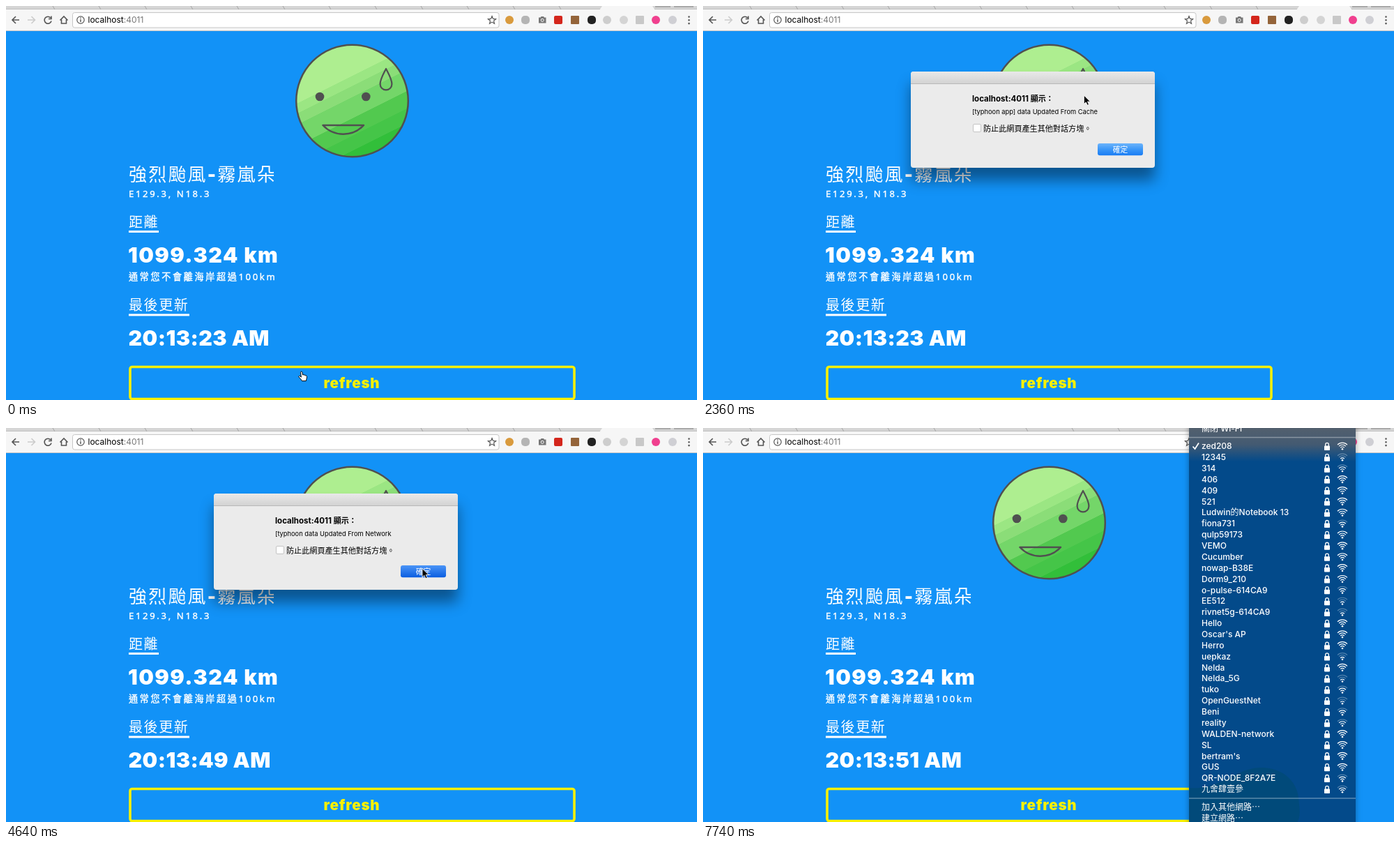
Animation of 991x565 px, one loop 8000 ms. Source, as an HTML page:

```html
<!DOCTYPE html>
<html lang="zh-TW">
<head>
<meta charset="utf-8">
<title>Typhoon distance</title>
<style>
html, body { margin: 0; width: 100%; height: 100%; overflow: hidden; background: #1292f7; }
svg { display: block; width: 991px; height: 565px; }
text { font-family: Inter, "Noto Sans CJK TC", "Noto Sans CJK", sans-serif; white-space: pre; }
.page { fill: #fff; }
.page text { font-family: "Noto Sans", "Noto Sans CJK TC", "Noto Sans CJK", sans-serif; }
.page .big { font: 900 30.5px Inter, sans-serif; letter-spacing: 1.4px; }
.page #clock { letter-spacing: .4px; }
.page .small { font-size: 13.1px; letter-spacing: 2.65px; stroke: #fff; stroke-width: .4px; }
.page .label { font-size: 20px; letter-spacing: 1.6px; }
.page .button { font: 900 20.5px Inter, sans-serif; letter-spacing: .8px; fill: #f8f000; }
.line { fill: none; stroke: #505050; stroke-width: 2.5; stroke-linejoin: round; }
.icon { fill: none; stroke: #555; stroke-width: 1.6; }
.menu { font-size: 12px; font-weight: 500; fill: #fff; }
.shadow { filter: drop-shadow(0 18px 10px rgba(0, 0, 0, .42)); }
</style>
</head>
<body>
<svg viewBox="0 0 991 565">
  <defs>
    <linearGradient id="skin" gradientUnits="userSpaceOnUse" x1="460.7" y1="64.4" x2="532.3" y2="207.6"></linearGradient>
    <linearGradient id="bar" x2="0" y2="1"><stop stop-color="#e9e9e9"/><stop offset="1" stop-color="#d3d3d3"/></linearGradient>
    <linearGradient id="up" x2="0" y2="1"><stop stop-color="#6cb4fb"/><stop offset=".5" stop-color="#3b97f8"/><stop offset="1" stop-color="#197cf4"/></linearGradient>
    <linearGradient id="down" x2="0" y2="1"><stop stop-color="#4b95f7"/><stop offset="1" stop-color="#0a5de0"/></linearGradient>
    <linearGradient id="glass" gradientUnits="userSpaceOnUse" x1="0" y1="0" x2="0" y2="48">
      <stop stop-color="#53606e"/><stop offset=".5" stop-color="#435a72"/><stop offset="1" stop-color="#034a8a"/>
    </linearGradient>
    <clipPath id="menuBox"><path d="M697 0H936V565H697Z"/></clipPath>
  </defs>

  <rect width="991" height="565" fill="#1292f7"/>

  <g class="page">
    <circle cx="496.5" cy="136" r="80.3" class="line" style="fill:url(#skin)"/>
    <circle cx="450" cy="130" r="6.3" fill="#505050"/>
    <circle cx="516.3" cy="130" r="6.3" fill="#505050"/>
    <path class="line" d="M454.5 171H513A40 40 0 0 1 454.5 171Z"/>
    <path class="line" style="stroke-width:2.2" d="M545 90C541 98 536.6 105 536.6 112A8.4 8.4 0 0 0 553.4 112C553.4 105 549 98 545 90Z"/>

    <text x="176" y="250.5" font-size="26" letter-spacing="2.2">強烈颱風<tspan font-family="Inter, sans-serif" font-weight="900">-</tspan>霧嵐朵</text>
    <text x="176" y="273.5" class="small">E129.3, N18.3</text>
    <text x="176" y="316.5" class="label">距離</text>
    <rect x="176" y="322" width="43" height="3"/>
    <text x="175" y="367.5" class="big">1099.324 km</text>
    <text x="176" y="393" class="small">通常您不會離海岸超過100km</text>
    <text x="176" y="435.5" class="label">最後更新</text>
    <rect x="176" y="441.5" width="87" height="3"/>
    <text x="175.5" y="487" class="big" id="clock"></text>
    <rect x="178" y="517.5" width="637" height="46" rx="3" fill="none" stroke="#f8f000" stroke-width="3.6"/>
    <text x="496" y="547.7" text-anchor="middle" class="button">refresh</text>
  </g>

  <g id="toolbar">
    <rect width="991" height="36" fill="#f6f6f6"/>
    <rect width="991" height="5" fill="#d5d5d5"/>
    <path d="M0 4.5H991M0 35.5H991" stroke="#bdbdbd" stroke-width=".8"/>
    <path id="tabs" stroke="#a5a5a5"/>
    <path d="M851 6L855 0H927L931 6Z" fill="#f6f6f6"/>
    <path d="M931 1H953M958 1H986" stroke="#aaa" stroke-width="2"/>
    <rect x="95.5" y="9.5" width="611.5" height="21.5" rx="3" fill="#fff" stroke="#c6c6c6"/>
    <path class="icon" d="M19 20H9M14 15L9 20L14 25"/>
    <path class="icon" style="stroke:#ccc" d="M31 20H41M36.5 15L41.5 20L36.5 25"/>
    <path class="icon" d="M64 17A5 5 0 1 0 65 21.5M65 14.5V18.5H61"/>
    <path class="icon" d="M77.5 20.5L83 15L88.5 20.5M79.5 19.5V25H86.5V19.5"/>
    <circle class="icon" style="stroke-width:1.2" cx="107" cy="20" r="5.2"/>
    <path class="icon" style="stroke-width:1.4" d="M107 19V23M107 16.6V18"/>
    <text x="117.5" y="24.4" font-size="12">localhost<tspan fill="#777">:4011</tspan></text>
    <path class="icon" style="stroke-width:1.2" d="M697 14.5L698.6 18.4L702.6 18.7L699.5 21.3L700.5 25.3L697 23.1L693.5 25.3L694.5 21.3L691.4 18.7L695.4 18.4Z"/>
    <g id="badges"></g>
    <path d="M764 16.5H766.5L767.5 15H771L772 16.5H774.5V24.5H764Z" fill="#777"/>
    <circle cx="769.2" cy="20.3" r="2" fill="none" stroke="#fff"/>
    <path d="M979.5 15.5V26" stroke="#555" stroke-width="2.6" stroke-linecap="round" stroke-dasharray="0 4.8"/>
  </g>

  <g id="dialog">
    <rect class="shadow" x="298" y="94" width="350" height="138" rx="4" fill="#ebebeb"/>
    <path d="M298 111V98A4 4 0 0 1 302 94H644A4 4 0 0 1 648 98V111Z" fill="url(#bar)"/>
    <path d="M298 111.5H648" stroke="#b8b8b8"/>
    <text x="386" y="136.8" font-size="11.5" font-weight="700">localhost:4011 <tspan font-size="11">顯示：</tspan></text>
    <text x="386" y="155.3" font-size="9.3" id="message"></text>
    <rect x="387.5" y="169.5" width="11" height="11" rx="1.5" fill="#fff" stroke="#c4c4c4"/>
    <text x="402" y="179.5" font-size="11.1">防止此網頁產生其他對話方塊。</text>
    <rect id="ok" x="566" y="197" width="65" height="17.3" rx="3"/>
    <text x="598.5" y="209.6" font-size="10.8" text-anchor="middle" fill="#fff">確定</text>
  </g>

  <g id="menu" class="menu">
    <rect x="697" y="-5" width="239" height="575" fill="url(#glass)" style="filter:drop-shadow(0 0 4px rgba(0,0,0,.35))"/>
    <path clip-path="url(#menuBox)" d="M697 516C740 520 765 487 800 487S852 510 854 530S858 556 850 570H697Z" fill="#004a74" opacity=".7"/>
    <path d="M697 13.5H936M697 531H936" stroke="#fff" stroke-opacity=".35" stroke-width="1.5"/>
    <text x="715" y="4.5">關閉 Wi-Fi</text>
    <path d="M702.5 26.5L705.5 30L711 21.5" fill="none" stroke="#fff" stroke-width="1.8"/>
    <text x="715" y="547.5">加入其他網路⋯</text>
    <text x="715" y="563.5">建立網路⋯</text>
  </g>

  <g id="cursor" stroke-linejoin="round">
    <path id="arrow" d="M0 0V12.6L2.9 9.9L5 14.3L7.2 13.3L5.2 9.1H9.2Z" stroke="#fff" stroke-width=".9"/>
    <path id="hand" transform="translate(-.5 -.8)" d="M1 1.2C1 -.4 3.2 -.4 3.4 1.2L4 5C4.5 4 6 4.2 6.2 5.3C7 4.5 8 5 8.2 6C9.3 5.4 10 6.2 10 7.2C10 9.5 9.4 10.5 8.8 13.5H3C1.6 11 .2 9.5 -1.6 7.8C-2.4 6.6 -.8 5.8 .4 6.8L1.8 8Z" fill="#fff" stroke="#000"/>
  </g>
</svg>
<script>
const $ = id => document.getElementById(id);
const LOOP = 8000;

function add(parent, tag, attrs, text = '') {
  const el = document.createElementNS('http://www.w3.org/2000/svg', tag);
  for (const key in attrs) el.setAttribute(key, attrs[key]);
  el.textContent = text;
  parent.append(el);
}

// Face shading: flat diagonal bands, each with the end of its range
const bands = [
  [.3, '#aeee90'], [.38, '#9be683'], [.47, '#8bdd78'], [.64, '#74d669'],
  [.78, '#52c94f'], [.9, '#45c548'], [1, '#32bf3a']
];
bands.forEach(([end, color], i) => {
  for (const offset of [i ? bands[i - 1][0] : 0, end])
    add($('skin'), 'stop', { offset, 'stop-color': color });
});

// Browser chrome: tab edges and extension badges
$('tabs').setAttribute('d', Array.from({ length: 12 }, (_, i) => `M${67 + 66 * i} 0l3 5`).join(''));
const badges = [
  [722, '#d99a3d', 6], [745, '#b4b4b4', 5], [792, '#d4261c', 2], [816, '#94643a', 1], [840, '#222', 5],
  [862, '#cdcdcd', 6], [886, '#d4d4d4', 6], [909, '#c8c8c8', 1], [932, '#f0408f', 6], [956, '#cfcfd4', 6]
];
for (const [x, fill, rx] of badges)
  add($('badges'), 'rect', { x: x - 6, y: 14, width: 12, height: 12, rx, fill });

// Wireless networks with signal strength 1 to 3
const networks = `zed208,12345,314,406,409,521,Ludwin的Notebook 13,fiona731,qulp59173,VEMO,Cucumber,
nowap-B38E,Dorm9_210,o-pulse-614CA9,EE512,rivnet5g-614CA9,Hello,Oscar's AP,Herro,uepkaz,Nelda,Nelda_5G,
tuko,OpenGuestNet,Beni,reality,WALDEN-network,SL,bertram's,GUS,QR-NODE_8F2A7E,九舍肆壹參`.replace(/\n/g, '').split(',');
const signals = '31233332333332113331312122333322';
networks.forEach((name, i) => {
  const y = 26 + 15.87 * i, menu = $('menu');
  add(menu, 'text', { x: 715, y: y + 4.2 }, name);
  add(menu, 'rect', { x: 891, y: y - .5, width: 8, height: 6.5, rx: .8 });
  add(menu, 'path', { d: `M892.7 ${y}v-2.3a2.3 2.3 0 0 1 4.6 0v2.3`, fill: 'none', stroke: '#fff', 'stroke-width': 1.3 });
  add(menu, 'circle', { cx: 917, cy: y + 4.3, r: 1.3 });
  for (let k = 1; k <= 3; k++) {
    const r = 1 + 2.9 * k, w = r * .72;
    add(menu, 'path', {
      d: `M${917 - w} ${y + 5 - w}A${r} ${r} 0 0 1 ${917 + w} ${y + 5 - w}`,
      fill: 'none', stroke: '#fff', 'stroke-width': 1.2, opacity: k <= signals[i] ? 1 : .3
    });
  }
});

// Pointer strokes: start, end, steps, then a quadratic curve
const moves = [
  [1430, 1630, 3, 422, 525, 450, 300, 519, 165],
  [1840, 2620, 10, 519, 165, 570, 105, 531, 141],
  [2710, 3100, 5, 531, 141, 570, 165, 597, 201.5],
  [5830, 6000, 3, 597, 201.5, 590, 320, 551, 410],
  [6180, 6740, 7, 551, 410, 675, 260, 686, 18]
];

function pointer(t) {
  const move = moves.filter(m => t >= m[0]).pop();
  if (!move) return [422, 525];
  const [start, end, steps, x0, y0, cx, cy, x1, y1] = move;
  const k = Math.min(1, (Math.floor((t - start) / (end - start) * (steps - 1) + 1e-6) + 1) / steps);
  const curve = (a, b, c) => (1 - k) ** 2 * a + 2 * k * (1 - k) * b + k * k * c;
  return [curve(x0, cx, x1), curve(y0, cy, y1)];
}

const within = (t, a, b) => t >= a && t < b;
const show = (id, on) => $(id).style.display = on ? '' : 'none';

function draw(t) {
  $('clock').textContent = `20:13:${t < 3660 ? 23 : t < 4880 ? 49 : 51} AM`;

  show('dialog', within(t, 980, 3660) || within(t, 3780, 4880));
  const [scale, alpha] = t < 1130 ? [.45, .25] : within(t, 3780, 3930) ? [.843, .72] : [1, 1];
  $('dialog').setAttribute('transform', `translate(473 163) scale(${scale}) translate(-473 -163)`);
  $('dialog').setAttribute('opacity', alpha);
  $('message').textContent = t < 3660 ? '[typhoon app] data Updated From Cache' : '[typhoon data Updated From Network';
  const pressed = within(t, 3450, 3660) || within(t, 4640, 4880);
  $('ok').setAttribute('fill', `url(#${pressed ? 'down' : 'up'})`);

  show('menu', t >= 7650);
  show('cursor', t < 6740);
  show('hand', t < 860);
  show('arrow', t >= 860);
  $('cursor').setAttribute('transform', `translate(${pointer(t)})`);
}

function tick() {
  draw(performance.now() % LOOP);
  requestAnimationFrame(tick);
}
tick();
</script>
</body>
</html>
```
